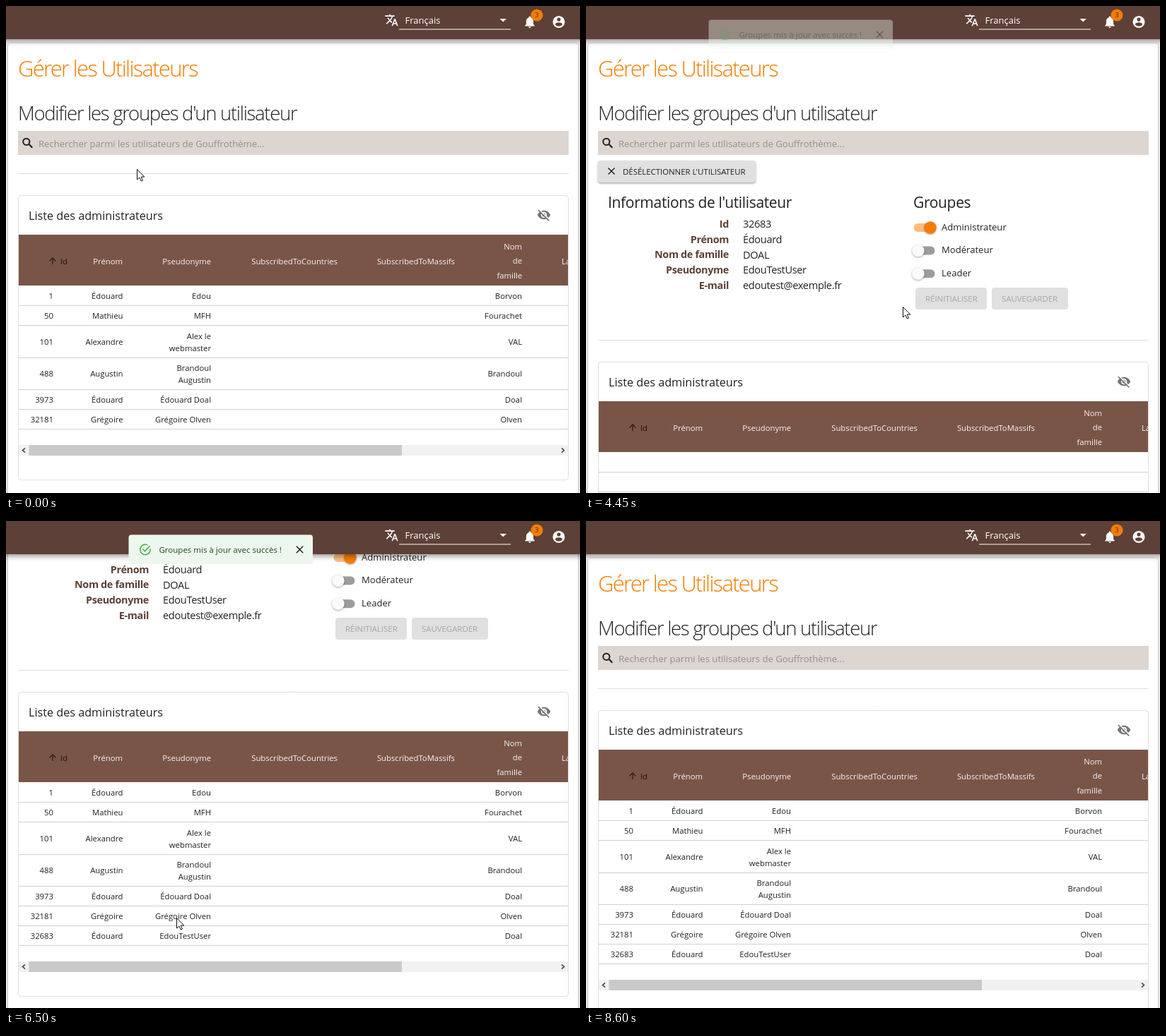
Write an HTML page with a canvas that moves like this. It is 812 px wide and 690 px high and loops after 9.2 s.

```html
<!DOCTYPE html>
<html lang="fr">
<head>
<meta charset="utf-8">
<title>Gérer les Utilisateurs</title>
<style>
html, body { margin: 0; width: 100%; height: 100%; overflow: hidden; background: #fafafa; }
canvas { display: block; }
</style>
</head>
<body>
<canvas id="stage" width="812" height="690"></canvas>
<script>
const ctx = document.getElementById('stage').getContext('2d');
const LOOP = 9200, STEP = 50, PANEL = 236;
const BROWN = '#5d4037', HEAD = '#795548', ORANGE = '#f57c00', INK = '#212121';

const ICONS = {
  translate: 'M12.87 15.07l-2.54-2.51.03-.03c1.74-1.94 2.98-4.17 3.71-6.53H17V4h-7V2H8v2H1v1.99h11.17C11.5 7.92 10.44 9.75 9 11.35 8.07 10.32 7.3 9.19 6.69 8h-2c.73 1.63 1.73 3.17 2.98 4.56l-5.09 5.02L4 19l5-5 3.11 3.11zM18.5 10h-2L12 22h2l1.12-3h4.75L21 22h2zm-2.62 7l1.62-4.33L19.12 17z',
  bell: 'M12 22c1.1 0 2-.9 2-2h-4c0 1.1.9 2 2 2zm6-6v-5c0-3.07-1.64-5.64-4.5-6.32V4a1.5 1.5 0 0 0-3 0v.68C7.63 5.36 6 7.92 6 11v5l-2 2v1h16v-1z',
  account: 'M12 2a10 10 0 1 0 0 20a10 10 0 0 0 0-20zM12 5a3 3 0 1 1 0 6a3 3 0 0 1 0-6zM12 19.2c-2.5 0-4.71-1.28-6-3.22.03-1.99 4-3.08 6-3.08s5.97 1.09 6 3.08c-1.29 1.94-3.5 3.22-6 3.22z',
  eye: 'M1 12C2.73 7.6 7 4.5 12 4.5S21.27 7.6 23 12C21.27 16.4 17 19.5 12 19.5S2.73 16.4 1 12zM12 7a5 5 0 1 0 0 10a5 5 0 0 0 0-10zM12 9a3 3 0 1 1 0 6a3 3 0 0 1 0-6z'
};
const POINTERS = {
  arrow: 'M0 0V14.5L3.4 11.4L5.8 16.6L8 15.6L5.7 10.6H10.3Z',
  hand: 'M-1.5 11V1.5a1.5 1.5 0 0 1 3 0V7q2.6-.9 3 .8q2.4-.6 2.8 1q2-.2 2 1.8V14q0 2-1.5 4.3V20H1V18.5L-4.8 12.8q-.8-2.2 1-2.2Z',
  beam: 'M-3-7.5h2l1 1l1-1h2M0-6.5v13M-3 7.5h2l1-1l1 1h2'
};

const QUERY = 'edoutest', MAIL = 'edoutest@exemple.fr', PSEUDO = 'EdouTestUser';
const ROWS = [
  ['1', 'Édouard', ['Edou'], 'Borvon'],
  ['50', 'Mathieu', ['MFH'], 'Fourachet'],
  ['101', 'Alexandre', ['Alex le', 'webmaster'], 'VAL'],
  ['488', 'Augustin', ['Brandoul', 'Augustin'], 'Brandoul'],
  ['3973', 'Édouard', ['Édouard Doal'], 'Doal'],
  ['32181', 'Grégoire', ['Grégoire Olven'], 'Olven'],
  ['32683', 'Édouard', [PSEUDO], 'Doal']
];

// time, x, y of the pointer's hot spot
const PATH = [
  [50, 185, 231], [450, 338, 194], [1650, 338, 194], [2100, 160, 248],
  [2500, 160, 248], [3250, 486, 311], [3380, 486, 311], [3550, 560, 436],
  [3800, 612, 415], [4080, 612, 415], [4750, 328, 434], [4950, 328, 434],
  [5120, 180, 420], [5280, 32, 320], [5420, 90, 225], [5700, 257, 309],
  [5850, 257, 309], [6100, 255, 309], [6450, 250, 560], [6750, 130, 590],
  [6900, 240, 585], [7150, 240, 505], [7650, 130, 234], [8050, 130, 234],
  [8550, 300, 720]
];
const KINDS = [
  [0, 'arrow'], [250, 'beam'], [1850, 'hand'], [2500, 'arrow'], [3150, 'hand'],
  [3450, 'arrow'], [3700, 'hand'], [4150, 'arrow'], [5650, 'beam'], [5900, 'arrow'],
  [7600, 'hand'], [8000, 'arrow']
];
const SCROLL = [[5850, 0], [6100, 154], [6350, 262], [7180, 262], [7600, 0]];

const clamp = v => Math.max(0, Math.min(1, v));
const ramp = (t, a, b) => clamp((t - a) / (b - a));
const ease = p => p * p * (3 - 2 * p);

function track(keys, t, i) {
  let v = keys[0][i];
  for (let k = 1; k < keys.length; k++) {
    v += (keys[k][i] - keys[k - 1][i]) * ease(ramp(t, keys[k - 1][0], keys[k][0]));
  }
  return v;
}

// y is the middle of the capitals; returns the width
function text(s, x, y, size, o = {}) {
  ctx.font = `${o.weight || 400} ${size}px "Open Sans", "Noto Sans", sans-serif`;
  ctx.letterSpacing = (o.gap || 0) + 'px';
  ctx.textAlign = o.align || 'left';
  ctx.fillStyle = o.color || INK;
  ctx.fillText(s, x, y + size * 0.36);
  return ctx.measureText(s).width;
}

function rect(x, y, w, h, color) {
  ctx.fillStyle = color;
  ctx.fillRect(x, y, w, h);
}

function box(x, y, w, h, r, color, blur = 0, dy = 0, shade = 0.35) {
  ctx.save();
  if (blur) {
    ctx.shadowColor = `rgba(0,0,0,${shade})`;
    ctx.shadowBlur = blur;
    ctx.shadowOffsetY = dy;
  }
  ctx.fillStyle = color;
  ctx.beginPath();
  ctx.roundRect(x, y, w, h, r);
  ctx.fill();
  ctx.restore();
}

function disc(x, y, r, color, blur) {
  box(x - r, y - r, 2 * r, 2 * r, r, color, blur, blur ? 1 : 0);
}

function line(color, width, ...pts) {
  ctx.strokeStyle = color;
  ctx.lineWidth = width;
  ctx.beginPath();
  for (let i = 0; i < pts.length; i += 2) ctx.lineTo(pts[i], pts[i + 1]);
  ctx.stroke();
}

function icon(name, cx, cy, size, color) {
  ctx.save();
  ctx.translate(cx, cy);
  ctx.scale(size / 24, size / 24);
  ctx.translate(-12, -12);
  ctx.fillStyle = color;
  ctx.fill(new Path2D(ICONS[name]), 'evenodd');
  ctx.restore();
}

function closeIcon(x, y, r) {
  line(INK, 1.5, x - r, y - r, x + r, y + r);
  line(INK, 1.5, x + r, y - r, x - r, y + r);
}

function drawSearch(t) {
  rect(17, 177, 779, 34, '#ddd5d0');
  ctx.strokeStyle = INK;
  ctx.lineWidth = 2;
  ctx.beginPath();
  ctx.arc(28.8, 192.3, 4.6, 0, 7);
  ctx.stroke();
  line(INK, 2.2, 32.4, 195.9, 37.3, 200.8);

  const active = t >= 700 && t < 2500;
  const count = active ? Math.max(0, Math.min(8, Math.floor((t - 700) / 75))) : 0;
  let w = 0;
  if (count) w = text(QUERY.slice(0, count), 46, 195, 13.1);
  else text('Rechercher parmi les utilisateurs de Gouffrothème...', 46, 195, 13.1, { color: '#968e8a' });
  if (active) rect(46 + Math.round(w), 187, 1, 16, '#000');
}

function drawOption(t) {
  const alpha = ramp(t, 1350, 1600);
  if (!alpha || t >= 2500) return;
  ctx.save();
  ctx.globalAlpha = alpha;
  box(44, 215, 752, 58, [0, 0, 4, 4], '#fff', 5, 2, 0.4);
  rect(44, 222, 752, 36, '#f5f5f5');
  box(58, 227, 24, 24, 4, BROWN);
  text('Édouard DOAL', 92, 240, 12.6);
  let x = 182;
  const small = (s, hit) => {
    const style = { weight: hit ? 700 : 600, color: hit ? '#fff' : '#999' };
    if (hit) {
      ctx.font = '700 9px "Open Sans", "Noto Sans", sans-serif';
      ctx.letterSpacing = '0px';
      rect(x, 234, ctx.measureText(s).width, 13, '#ff9800');
    }
    x += text(s, x, 240.5, 9, style);
  };
  small('mail:');
  small(QUERY, true);
  small(MAIL.slice(QUERY.length));
  x += 8;
  small('pseudo:');
  small(PSEUDO, true);
  ctx.restore();
}

function drawSwitch(x, y, on, halo) {
  const mix = (a, b) => Math.round(a + (b - a) * on);
  box(x - 15, y - 6, 30, 12, 6, `rgb(${mix(156, 250)},${mix(156, 189)},${mix(156, 127)})`);
  const tx = x - 8.5 + 17 * on;
  if (halo) disc(tx, y, 11.5, `rgba(245,124,0,${0.18 * halo})`);
  disc(tx, y, 8.7, `rgb(${mix(250, 245)},${mix(250, 124)},${mix(250, 0)})`, 3);
}

function drawButton(label, x, y, w, tx, fill, color, raised) {
  box(x, y, w, 31, 4, fill, raised ? 3 : 0, 1.5);
  text(label, tx, y + 15.5, 11.4, { color });
}

function drawUser(t) {
  drawButton("DÉSÉLECTIONNER L'UTILISATEUR", 17, 219, 223, 52,
    t >= 7600 ? '#d5d5d5' : '#e0e0e0', INK, true);
  closeIcon(36, 234, 4.5);

  const gap = -0.35;
  text("Informations de l'utilisateur", 31, 278, 21, { gap });
  [['Id', '32683'], ['Prénom', 'Édouard'], ['Nom de famille', 'DOAL'],
   ['Pseudonyme', PSEUDO], ['E-mail', MAIL]].forEach(([k, v], i) => {
    const y = 308.7 + i * 21.8;
    text(k, 202, y, 14.4, { align: 'right', weight: 700, color: BROWN, gap });
    text(v, 222, y, 14.6, { gap });
  });

  text('Groupes', 463, 278, 21, { gap });
  const on = ease(ramp(t, 3330, 3480));
  const halo = on * (1 - ramp(t, 3600, 3850));
  ['Administrateur', 'Modérateur', 'Leader'].forEach((s, i) => {
    drawSwitch(478.5, 314 + i * 32.6, i ? 0 : on, i ? 0 : halo);
    text(s, 503, 313 + i * 32.6, 13.1);
  });

  const dirty = t >= 3400 && t < 4150;
  const off = 'rgba(0,0,0,.26)';
  drawButton('RÉINITIALISER', 466, 399, 101, 480, '#e0e0e0', dirty ? INK : off, dirty);
  const hover = t >= 3700;
  drawButton('SAUVEGARDER', 574, 399, 108, 588,
    dirty ? (hover ? '#4a322b' : BROWN) : '#e0e0e0', dirty ? '#fff' : off, dirty);
}

function drawTable(t) {
  const rows = ROWS.slice(0, t >= 4500 ? 7 : 6);
  const loading = t >= 4350 && t < 4500;
  const tall = rows.length > 6 ? 28.2 : 0;
  line('#dedede', 1, 17, 237.5, 796, 237.5);

  ctx.strokeStyle = '#dedede';
  ctx.lineWidth = 1;
  ctx.beginPath();
  ctx.roundRect(17.5, 268.5, 778, 403 + tall, 4);
  ctx.stroke();
  text('Liste des administrateurs', 32, 297, 16.2);
  icon('eye', 761, 296, 20, '#757575');
  line('#fff', 1.6, 754.2, 288.2, 769.6, 303.6);
  line('#757575', 1.7, 752.8, 289, 768.2, 304.4);

  rect(18, 324, 777, 72, HEAD);
  const head = { align: 'right', color: '#f7f3f2' };
  text('Id', 87, 361.5, 11.3, { align: 'right', color: '#1d1412' });
  line('#2b1d19', 1.3, 66, 366, 66, 357);
  line('#2b1d19', 1.3, 61.5, 361.5, 66, 357, 70.5, 361.5);
  [['Prénom', 165], ['Pseudonyme', 290], ['SubscribedToCountries', 469], ['SubscribedToMassifs', 635]]
    .forEach(([s, x]) => text(s, x, 361.5, 11.3, head));
  ['Nom', 'de', 'famille'].forEach((s, i) => text(s, 730, 340.5 + i * 20.5, 11.3, head));
  ctx.save();
  ctx.beginPath();
  ctx.rect(18, 324, 777, 72);
  ctx.clip();
  text('Langue', 786, 361.5, 11.3, { color: '#f7f3f2' });
  ctx.restore();

  let y = 396.3;
  const right = { align: 'right' };
  for (const [id, first, nick, last] of rows) {
    const h = nick.length > 1 ? 45.3 : 28.2, mid = y + h / 2 + 0.6;
    if (!loading) {
      text(id, 67, mid, 11.3, right);
      text(first, 165.5, mid, 11.3, right);
      nick.forEach((s, i) => text(s, 290, mid + (i - (nick.length - 1) / 2) * 17, 11.3, right));
      text(last, 730, mid, 11.3, right);
    }
    y += h;
    rect(18, Math.floor(y), 777, 1, '#d7cecb');
  }

  const bar = Math.round(y + 22.3);
  rect(18, bar, 777, 15, '#f1f1f1');
  rect(32.5, bar, 527.5, 15, '#c9c9c9');
  const c = bar + 7.5;
  line('#505050', 1.7, 27, c - 3.2, 23.5, c, 27, c + 3.2);
  line('#505050', 1.7, 786, c - 3.2, 789.5, c, 786, c + 3.2);
}

function drawBar() {
  box(-10, -10, 832, 57, 0, BROWN, 8, 2, 0.5);
  icon('translate', 545.5, 20, 20, '#fff');
  text('Français', 564.5, 20, 13, { color: '#fff' });
  rect(556, 32.5, 158, 1, '#fff');
  ctx.fillStyle = '#fff';
  ctx.fill(new Path2D('M698.5 18h9.5l-4.75 4.6z'));
  icon('bell', 741, 22.5, 20.5, '#fff');
  disc(751, 13, 8.6, ORANGE);
  text('3', 751, 13, 9.5, { align: 'center', color: '#3b2a20' });
  icon('account', 782, 22.5, 20.5, '#fff');
}

function drawToast(t) {
  const alpha = ramp(t, 4350, 4600) * (1 - ramp(t, 8250, 8450));
  if (!alpha) return;
  ctx.save();
  ctx.globalAlpha = alpha;
  box(173.5, 19.5, 260.5, 41.5, 4, '#edf7ed');
  ctx.strokeStyle = '#4caf50';
  ctx.lineWidth = 1.6;
  ctx.beginPath();
  ctx.arc(197, 40.5, 7.2, -0.15, 5.2);
  ctx.stroke();
  line('#4caf50', 1.6, 193.3, 39.5, 196.4, 42.8, 203.6, 35.2);
  text('Groupes mis à jour avec succès !', 216.5, 41, 11.5, { color: '#1e4620' });
  closeIcon(415.5, 40.5, 4.7);
  ctx.restore();
}

function drawPointer(t) {
  if (t >= 8600) return;
  const kind = KINDS.filter(k => k[0] <= t).pop()[1];
  const shape = new Path2D(POINTERS[kind]);
  ctx.save();
  ctx.translate(Math.round(track(PATH, t, 1)) + 0.5, Math.round(track(PATH, t, 2)) + 0.5);
  ctx.lineJoin = 'round';
  if (kind !== 'beam') {
    ctx.fillStyle = '#fff';
    ctx.fill(shape);
  }
  ctx.strokeStyle = '#111';
  ctx.lineWidth = 1;
  ctx.stroke(shape);
  ctx.restore();
}

function draw(t) {
  const selected = t >= 2500 && t < 8000;
  rect(0, 0, 812, 690, '#fafafa');
  ctx.save();
  ctx.translate(0, -Math.round(track(SCROLL, t, 1)));
  box(3, 53, 806, 1000, 4, '#fff', 4, 1, 0.4);
  text('Gérer les Utilisateurs', 17, 89, 31, { weight: 300, gap: -1.7, color: ORANGE });
  text("Modifier les groupes d'un utilisateur", 17, 152, 27.5, { weight: 300, gap: -1.3 });
  drawSearch(t);
  if (selected) drawUser(t);
  ctx.save();
  if (selected) ctx.translate(0, PANEL);
  drawTable(t);
  ctx.restore();
  drawOption(t);
  ctx.restore();
  drawBar();
  drawToast(t);
  drawPointer(t);
}

const start = performance.now();
function frame() {
  const t = (performance.now() - start) % LOOP;
  draw(Math.floor(t / STEP) * STEP);
  requestAnimationFrame(frame);
}
frame();
</script>
</body>
</html>
```
